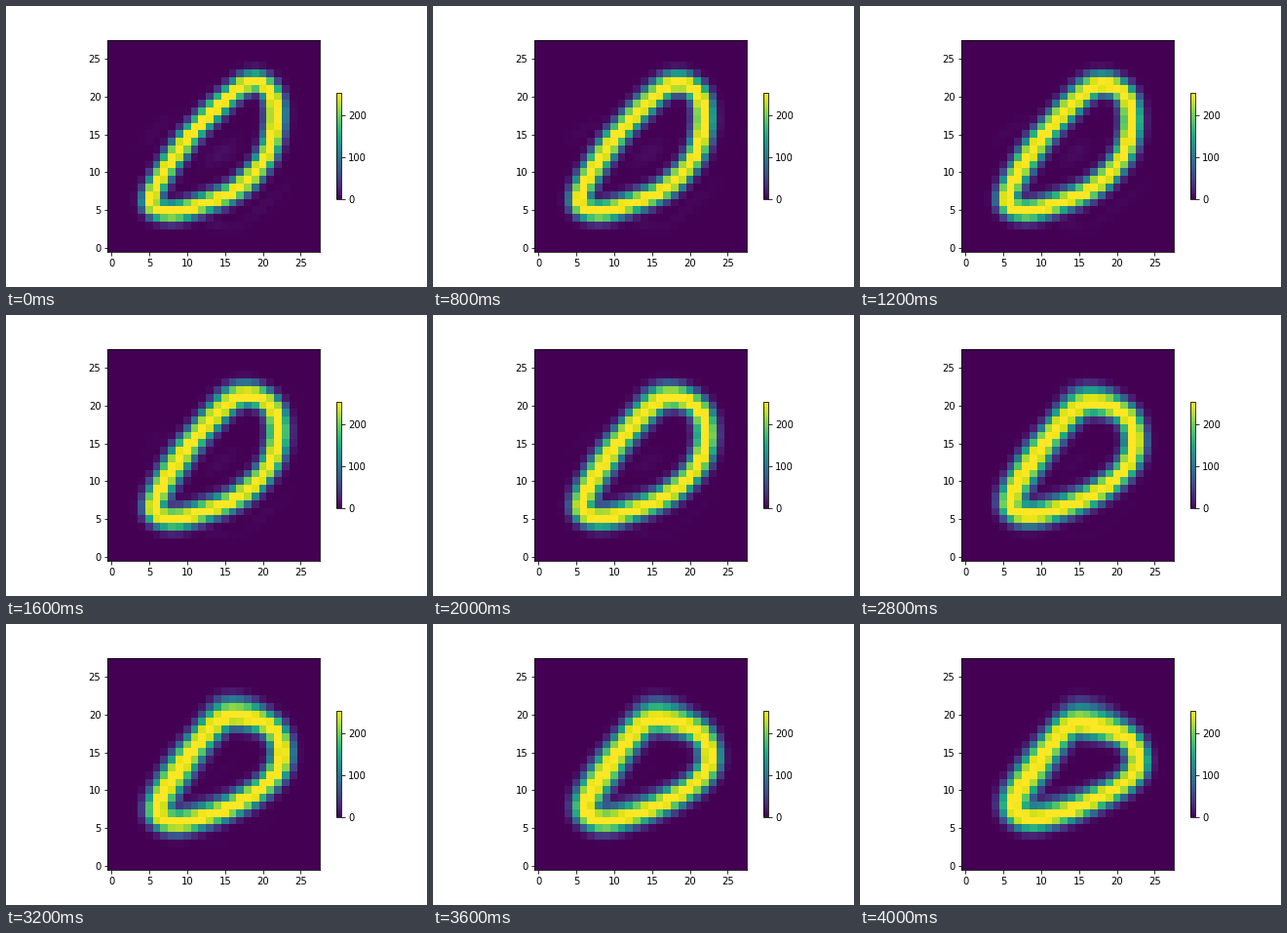
These frames come from a looping animation (432x288 px, 4200 ms). A matplotlib script:

```python
import numpy as np
import matplotlib.pyplot as plt
from matplotlib.animation import FuncAnimation
from matplotlib.path import Path

FRAMES, INTERVAL = 21, 200
SIZE, PEAK = 28, 254

# Key points of the stroke's centre line, anticlockwise from the left tip.
START = np.array([(5.3, 6.6), (7.6, 4.8), (12, 5.8), (16.7, 7.9), (20.2, 11.7),
                  (21.6, 16.2), (21.2, 20.3), (18.8, 21.9), (15.5, 20), (9.5, 13.7)])
END = np.array([(6.4, 8.3), (8.4, 6.3), (12.6, 7), (17.5, 9), (21.3, 11.2),
                (22.8, 13.8), (21.3, 16.9), (16.6, 18.5), (13.3, 18.2), (9.2, 13)])
EASE = np.array([1.2, 1.9])  # the loop sinks later than it slides sideways

X, Y = np.meshgrid(np.arange(SIZE), np.arange(SIZE))
CELLS = np.column_stack([X.ravel(), Y.ravel()])


def blob(x, y, along, across, angle=0):
    c, s = np.cos(np.radians(angle)), np.sin(np.radians(angle))
    u = (X - x) * c + (Y - y) * s
    v = (Y - y) * c - (X - x) * s
    return np.exp(-(u / along) ** 2 - (v / across) ** 2)


def closed_curve(points, steps=30):
    """Catmull-Rom spline through a ring of points."""
    a, b, c, d = (np.roll(points, k, axis=0)[:, None] for k in (1, 0, -1, -2))
    u = np.linspace(0, 1, steps, endpoint=False)[None, :, None]
    curve = 0.5 * (2 * b + (c - a) * u + (2 * a - 5 * b + 4 * c - d) * u**2
                   + (3 * b - a - 3 * c + d) * u**3)
    return curve.reshape(-1, 2)


def ghosts(t):
    """Faint smudges around the stroke that fade as it deforms."""
    return (1 - t) * (11 * blob(14.5, 12.5, 2.5, 1.2, 35)
                      + 6 * blob(6, 15.5, 3, 0.9, 40)
                      + 6 * blob(20, 5.5, 5, 0.9, 40)
                      + 8 * blob(14, 2.8, 2, 0.6))


def heat(t):
    curve = closed_curve(START + (END - START) * t ** EASE)
    gap = CELLS[:, None] - curve[None]
    dist = np.sqrt((gap ** 2).sum(axis=2).min(axis=1)).reshape(SIZE, SIZE)
    inside = Path(curve).contains_points(CELLS).reshape(SIZE, SIZE)

    # The stroke blurs with time, most on the left flank and above the top.
    width = 1.35 + t * (0.15 + 0.5 * blob(9, 12, 9, 5, 50))
    width += np.where(inside, 0, t * blob(16, 22, 5, 3, -20))
    stroke = 265 * np.exp(-(dist / width) ** 2.5)
    return np.minimum(np.maximum(stroke, ghosts(t)), PEAK)


fig, ax = plt.subplots(figsize=(6, 4), dpi=72, facecolor="white")
fig.subplots_adjust(left=0.125, right=0.9, bottom=0.125, top=0.88)
image = ax.imshow(heat(0), origin="lower", cmap="viridis",
                  vmin=0, vmax=PEAK, interpolation="nearest")
fig.colorbar(image, ax=ax, shrink=0.5)


def update(frame):
    image.set_data(heat(frame / (FRAMES - 1)))
    return [image]


anim = FuncAnimation(fig, update, frames=FRAMES, interval=INTERVAL,
                     repeat=True, repeat_delay=0)
plt.show()
```
